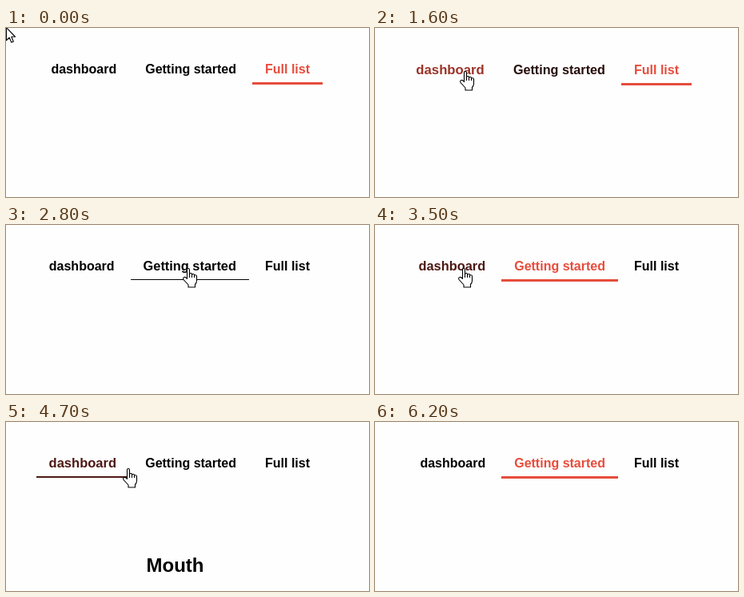
Write an HTML page that moves like this. It is 454 px wide and 212 px high and loops after 6300 ms.

```html
<!DOCTYPE html>
<html lang="en">
<head>
<meta charset="utf-8">
<title>Tab bar</title>
<style>
html, body { margin: 0; width: 100%; height: 100%; overflow: hidden; background: #fff; }
svg { display: block; width: 454px; height: 212px; font: bold 16px "Liberation Sans", Arial, sans-serif; }
.cursor path { fill: #fff; stroke: #000; stroke-width: 1.1; stroke-linejoin: round; }
</style>
</head>
<body>
<svg viewBox="0 0 454 212">
  <rect width="454" height="212" fill="#fefefe"/>
  <g id="tabs"></g>
  <text id="page" x="175.5" y="188" font-size="24">Mouth</text>
  <g id="arrow" class="cursor">
    <path d="M.5 .5V16.5L4.2 13L6.8 19L9.3 18L6.8 12H11.5Z"/>
  </g>
  <g id="hand" class="cursor">
    <path d="M5.5 13V2Q5.5 .5 7 .5T8.5 2V7Q11.5 5.5 11.5 8Q14.5 6.5 14.5 9Q17.5 8 17.5 10.5V16Q17.5 18.5 15.5 20.5V24H7V21L1 14.5Q0 12 2 11.5Q3.5 11 5.5 13.5Z"/>
    <path d="M8.5 7V12M11.5 8V12M14.5 9V12"/>
  </g>
</svg>
<script>
const LOOP = 6300, STEP = 100, FADE = 300;
const RIGHT = 396, PAD = 16, GAP = 4, BASELINE = 57;
const SIZE = 16, GROWTH = 1.1, WEIGHT = 3;
const RED = [231, 76, 60];
const $ = id => document.getElementById(id);

// Right to left; hover and active are [from, to] spans in ms.
const tabs = [
  { label: "Full list", width: 56,
    hover: [[600, 1000], [2200, 2500]], active: [[-FADE, 2500]] },
  { label: "Getting started", width: 113.8,
    hover: [[1000, 1350], [1900, 2100], [2700, 3200], [4850, 5200]],
    active: [[2700, 3500], [4850, LOOP]] },
  { label: "dashboard", width: 81.8,
    hover: [[1400, 1800], [3400, 3800], [4500, 4650]], active: [[3500, 4650]] }
];

// Pointer visits: [time, x, y]; between visits it is off the stage.
const paths = [
  [[0, 0, -1], [50, 0, -1]],
  [[500, 405, 100], [700, 365, 56], [900, 335, 54], [1000, 285, 55], [1600, 113, 54],
    [1800, 100, 54], [2300, 350, 56], [2500, 345, 56], [2800, 228, 54], [3600, 95, 54],
    [3800, 100, 56], [4000, 115, 175]],
  [[4500, 110, 110], [4600, 115, 60], [5000, 267, 50], [5300, 270, 52], [5400, 265, 110]]
];

const clamp = v => Math.min(1, Math.max(0, v));

// Fades in when a span starts and out when it ends.
function level(spans, t) {
  return Math.max(...spans.map(([from, to]) =>
    Math.min(clamp((t - from) / FADE), clamp((to - from) / FADE), clamp(1 - (t - to) / FADE))));
}

function along(path, t) {
  const i = Math.max(1, path.findIndex(p => p[0] >= t));
  const a = path[i - 1], b = path[i], k = (t - a[0]) / (b[0] - a[0]);
  return [1, 2].map(n => a[n] + (b[n] - a[n]) * k);
}

function set(node, attrs) {
  for (const name in attrs) node.setAttribute(name, attrs[name]);
}

function add(tag) {
  return $("tabs").appendChild(document.createElementNS("http://www.w3.org/2000/svg", tag));
}

function show(node, on) {
  node.setAttribute("visibility", on ? "visible" : "hidden");
}

for (const tab of tabs) {
  tab.text = add("text");
  tab.text.textContent = tab.label;
  tab.bar = add("rect");
}

function drawTabs(t) {
  for (const tab of tabs) {
    tab.h = level(tab.hover, t);
    tab.a = level(tab.active, t);
  }
  // A grown tab without an underline pushes the row down.
  const y = BASELINE + (tabs.some(tab => tab.h - tab.a > .5) ? 1 : 0);
  let right = RIGHT;
  for (const { label, width, text, bar, h, a } of tabs) {
    const size = SIZE + GROWTH * h;
    const left = right - width * size / SIZE - 2 * PAD;
    const x = Math.round(left);
    // Red when hovered or active, black when both.
    const fill = `rgb(${RED.map(c => Math.round(c * Math.abs(a - h)))})`;
    set(text, { x: left + PAD, y, fill, "font-size": size });
    set(bar, { x, y: y + (h > .5 ? 12 : 11), width: Math.round(right) - x, fill,
      height: a > 0 ? Math.max(1, Math.floor(WEIGHT * a)) : 0 });
    right = left - GAP;
  }
}

function drawCursor(t) {
  const path = paths.find(p => t >= p[0][0] && t <= p[p.length - 1][0]);
  const [x, y] = path ? along(path, t) : [0, 0];
  const over = y > 33 && y < 72;
  show($("arrow"), path && !over);
  show($("hand"), path && over);
  set($("arrow"), { transform: `translate(${x} ${y})` });
  set($("hand"), { transform: `translate(${Math.round(x - 7.5)} ${Math.round(y)})` });
}

function draw(ms) {
  const t = Math.floor(ms % LOOP / STEP) * STEP;
  drawTabs(t);
  show($("page"), t >= 3600 && t < 4900);
  drawCursor(t);
}

const start = performance.now();
function frame() {
  draw(performance.now() - start);
  requestAnimationFrame(frame);
}
frame();
</script>
</body>
</html>
```
